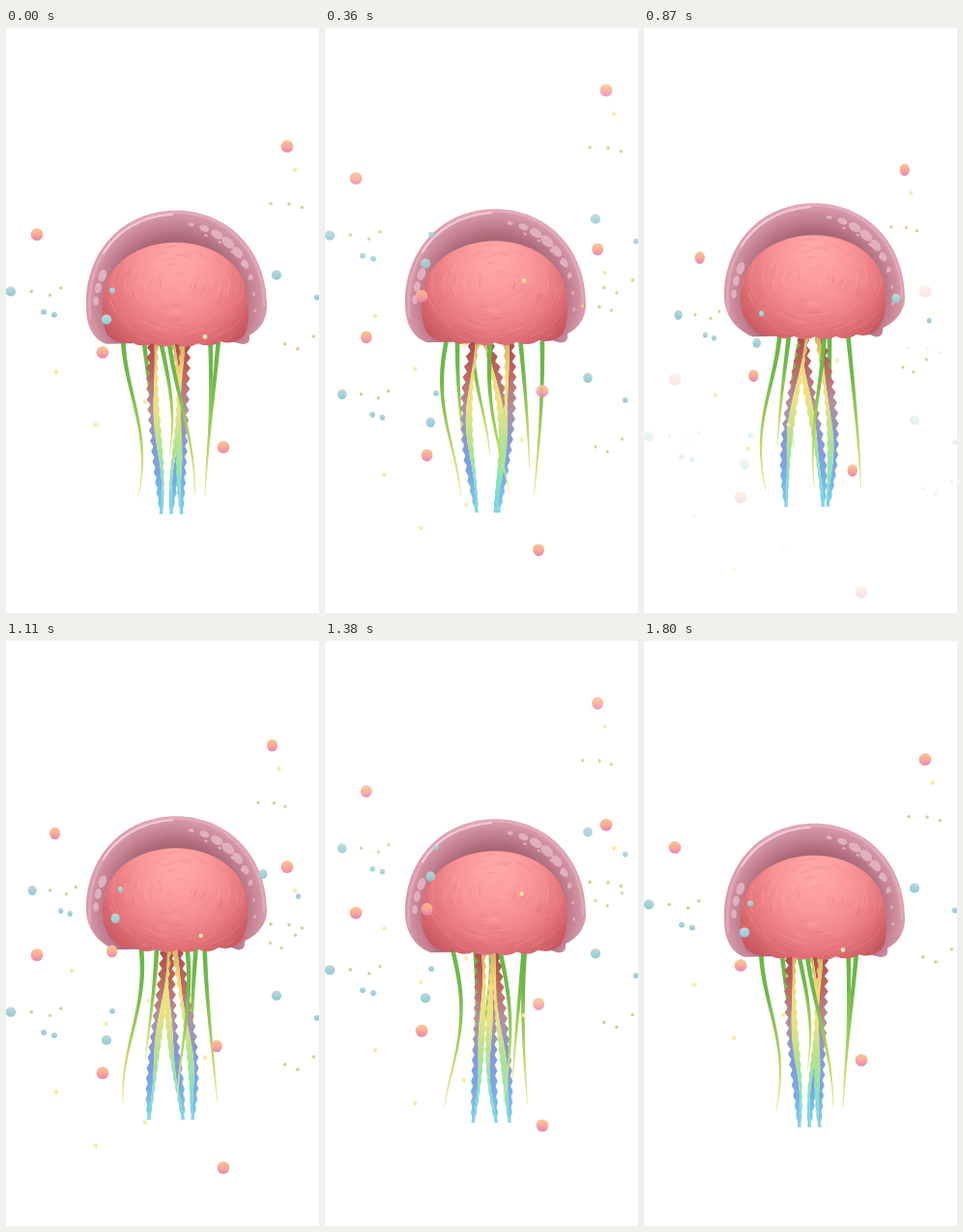
Recreate the animation shown at these times as an HTML page with a canvas. Size 324 px wide and 605 px high, loop 1.83 s.

```html
<!DOCTYPE html>
<html lang="en">
<head>
<meta charset="utf-8">
<title>Jellyfish</title>
<style>
  html, body { margin: 0; width: 100%; height: 100%; overflow: hidden; background: #fff; }
  canvas { display: block; width: 324px; height: 605px; }
</style>
</head>
<body>
<canvas id="sea"></canvas>
<script>
const W = 324, H = 605, LOOP = 1830, CYCLE = 1800, STEP = 30;
const canvas = document.getElementById('sea');
const ctx = canvas.getContext('2d');
const dpr = window.devicePixelRatio || 1;
canvas.width = W * dpr;
canvas.height = H * dpr;

const wave = (t, peak) => Math.cos((t - peak) / CYCLE * 2 * Math.PI);
const mod = (a, n) => ((a % n) + n) % n;
const clamp = v => Math.max(0, Math.min(1, v));

function rng(seed) {
  return () => (seed = (seed * 16807) % 2147483647) / 2147483647;
}

// Spreads the colors evenly over a gradient
function ramp(gradient, ...colors) {
  colors.forEach((c, i) => gradient.addColorStop(i / (colors.length - 1), c));
  return gradient;
}

function oval(x, y, rx, ry, tilt, fill) {
  ctx.beginPath();
  ctx.ellipse(x, y, rx, ry, tilt, 0, 7);
  ctx.fillStyle = fill;
  ctx.fill();
}

// ---- Tentacles: a sway that travels down from the root ---------------
const strand = (x, peak, lag, len, lean = 0) => ({ x, peak, lag, len, lean, sway: 10, bow: 0 });
const backStrands = [
  strand(147, 1230, .23, 116),
  strand(202, 1720, .2, 132),
  strand(162, 1300, .4, 118)
];
const frontStrands = [
  strand(131, 970, .61, 161),
  strand(178, 1020, .47, 158, 8),
  strand(215, 310, .256, 159)
];
const frill = (x, peak, lag, lean, side) =>
  ({ x, peak, lag, lean, side, len: 178, sway: 7, bow: 3.5 * side });
const frills = [
  frill(170, 1600, .61, 8, 1),
  frill(182, 360, .44, 4, 1),
  frill(160, 990, .48, -6, -1)
];

const GREENS = ['#68b646', '#70b84a', '#94c955', '#c2dd6c', '#eaee9c'];
const OUTER = ['#b2494a', '#bd6a62', '#b391a0', '#8498d8', '#7ba9e6', '#7cd4ec'];
const INNER = ['#d3ae62', '#f1de78', '#e6e384', '#b4e28e', '#8ce4b8', '#70cfec'];

function ribbon(s, t, top, left, right, colors, n) {
  const path = edge => Array.from({ length: n + 1 }, (_, i) => {
    const u = i / n;
    const x = s.x + s.lean * u + s.bow * Math.sin(Math.PI * u)
      + s.sway * wave(t, s.peak + s.lag * u * CYCLE);
    return [x + edge(u, i), top + s.len * u];
  });
  ctx.beginPath();
  path(left).concat(path(right).reverse()).forEach(p => ctx.lineTo(...p));
  ctx.closePath();
  ctx.fillStyle = ramp(ctx.createLinearGradient(0, top, 0, top + s.len), ...colors);
  ctx.fill();
}

function drawStrand(s, t, top) {
  const w = u => .4 + 2 * Math.pow(1 - u, .8);
  ribbon(s, t, top, u => -w(u), w, GREENS, 32);
}

function drawFrill(s, t, top) {
  const body = u => 1 + (2 + 3 * u) * (1 - u ** 4);
  const outer = (u, i) => s.side * (body(u) + (i % 2) * (4 - 3 * u * u));
  const inner = (u, i) => -s.side * (body(u) + (i % 2) * (2 - 1.5 * u));
  const seam = u => s.side * body(u) * .4 * Math.sin(u * 9 + s.peak);
  ribbon(s, t, top, outer, seam, OUTER, 33);
  ribbon(s, t, top, seam, inner, INNER, 33);
}

function drawTentacles(t, bob) {
  const top = 325 + bob;
  backStrands.forEach(s => drawStrand(s, t, top));
  frills.forEach(s => drawFrill(s, t, top));
  frontStrands.forEach(s => drawStrand(s, t, top));
}

// ---- Bell: the lower corners pull in by p (0..1) ---------------------
const bellPath = p => new Path2D(`M${104 + 9 * p} 327
  C${88 + 5 * p} ${322 - 3 * p} 82 ${305 - 4 * p} 83 283
  C84 230 122 189 176 189 C230 189 269 230 270 285
  C271 300 ${264 - 4 * p} 312 ${252 - 5 * p} 318
  Q${254 - 6 * p} 328 ${244 - 5 * p} 327 L232 324 Z`);

function bellyPath(p) {
  const left = 105 + 7 * p, right = 246 - 4 * p, lobes = 6;
  const path = new Path2D(`M${left} 318 C98 303 99 288 101 277
    C104 243 138 222 176 222 C214 222 248 244 250 280
    C252 300 ${251 - 4 * p} 312 ${right} 319`);
  const sag = u => 319 + 9 * Math.sqrt(Math.sin(Math.PI * clamp(u)));
  for (let i = 1; i <= lobes; i++) {
    const x = u => right + (left - right) * u / lobes;
    path.quadraticCurveTo(x(i - .5), sag((i - .5) / lobes) + 5, x(i), sag(i / lobes) - 1);
  }
  return path;
}

const shine = new Path2D('M101 233 C114 211 140 195 172 193');
const rimLight = new Path2D('M87 300 C81 230 128 191 176 191 C228 191 267 232 267 287');
const rimFill = ramp(ctx.createRadialGradient(176, 284, 58, 176, 284, 96),
  '#a35f6e', '#ad6a79', '#bf7d8e', '#cf8f9f', '#dda3b0');
const bellyFill = ramp(ctx.createRadialGradient(178, 238, 0, 176, 256, 94),
  '#ffa8a8', '#fd9fa0', '#f68f92', '#e4747a', '#c5525c');

// Fine curved brush marks over the belly
const marks = [new Path2D(), new Path2D()];
const rand = rng(77);
for (let i = 0; i < 240; i++) {
  const r = 8 + 82 * rand(), a = rand() * 6.283;
  const arc = new Path2D();
  arc.ellipse(178, 264, r, r * .82, 0, a, a + .12 + rand() * .3);
  marks[i % 2].addPath(arc);
}

function line(path, color, width) {
  ctx.strokeStyle = color;
  ctx.lineWidth = width;
  ctx.stroke(path);
}

// Spots follow the rim, long side along the arc
function rimSpot(degrees, r, size) {
  const a = degrees * Math.PI / 180;
  oval(176 + r * Math.cos(a), 284 + r * Math.sin(a), size, size * .62,
    a + Math.PI / 2, 'rgba(230,188,199,.8)');
}

function drawSpots() {
  for (let i = 0; i < 7; i++) {
    rimSpot(-79 + 10 * i, 82, 3 + 4.5 * Math.sin(Math.PI * i / 6));
    rimSpot(-66 + 12 * i, 76 + i, 2);
  }
  for (let i = 0; i < 3; i++) rimSpot(200 - 9.5 * i, 81 + i, 6.5 - i);
}

function drawBell(bob) {
  const pinch = -bob / 8;
  const belly = bellyPath(pinch);
  ctx.save();
  ctx.translate(0, bob);
  ctx.lineCap = 'round';
  ctx.fillStyle = rimFill;
  ctx.fill(bellPath(pinch));
  line(rimLight, 'rgba(236,186,198,.45)', 3);
  line(shine, 'rgba(250,222,230,.7)', 2);
  drawSpots();
  ctx.fillStyle = bellyFill;
  ctx.fill(belly);
  ctx.clip(belly);
  line(marks[0], 'rgba(255,200,200,.22)', .8);
  line(marks[1], 'rgba(185,60,75,.14)', .8);
  ctx.restore();
}

// ---- Bubbles ---------------------------------------------------------
const swarm = [
  { r: 6.4, colors: ['#fbc794', '#f8ac98', '#ee82b4'],
    at: [[291, 122], [32, 213], [225, 433], [100, 335]] },
  { r: 5.2, colors: ['#c4d8da', '#a6d2d8', '#8fcad2'],
    at: [[280, 255], [5, 272], [104, 301]] },
  { r: 3, colors: ['#c4d8da', '#9fd2da', '#8fcad2'],
    at: [[39, 293], [50, 296], [110, 271], [322, 278]] },
  { r: 2.3, colors: ['#faf2b4', '#f3e79c'],
    at: [[299, 146], [52, 355], [93, 410], [144, 386], [206, 319]] }
];
// Specks gather loosely around a few places
const specks = { r: 1.8, colors: ['#e0e098', '#c3ca84'], at: [] };
for (const [x, y] of [[290, 182], [40, 272], [301, 325]])
  for (let i = -1; i <= 1; i++)
    specks.at.push([x + i * 16 + 6 * rand(), y + 18 * (rand() - .5)]);
swarm.push(specks);

function drawBubbles(age, squeeze) {
  ctx.save();
  ctx.globalAlpha = Math.min(clamp(age / 240), clamp((1770 - age) / 480));
  ctx.translate(174, 160 - .1612 * age);
  ctx.scale(squeeze, 1);
  for (const { r, colors, at } of swarm)
    for (const [x, y] of at)
      oval(x - 174, y, r, r, 0,
        ramp(ctx.createLinearGradient(0, y - r, 0, y + r), ...colors));
  ctx.restore();
}

// ---- Loop ------------------------------------------------------------
function draw(t) {
  const bob = 4 * wave(t, 90) - 4;
  ctx.setTransform(dpr, 0, 0, dpr, 0, 0);
  ctx.fillStyle = '#fff';
  ctx.fillRect(0, 0, W, H);
  drawTentacles(t, bob);
  drawBell(bob);
  drawBubbles(mod(t - 810, CYCLE), 1);
  drawBubbles(mod(t - 30, CYCLE), Math.min(1, .819 + .000207 * Math.abs(t - 870)));
}

const start = performance.now();
function tick() {
  const t = (performance.now() - start) % LOOP;
  draw(Math.floor(t / STEP) * STEP);
  requestAnimationFrame(tick);
}
tick();
</script>
</body>
</html>
```
